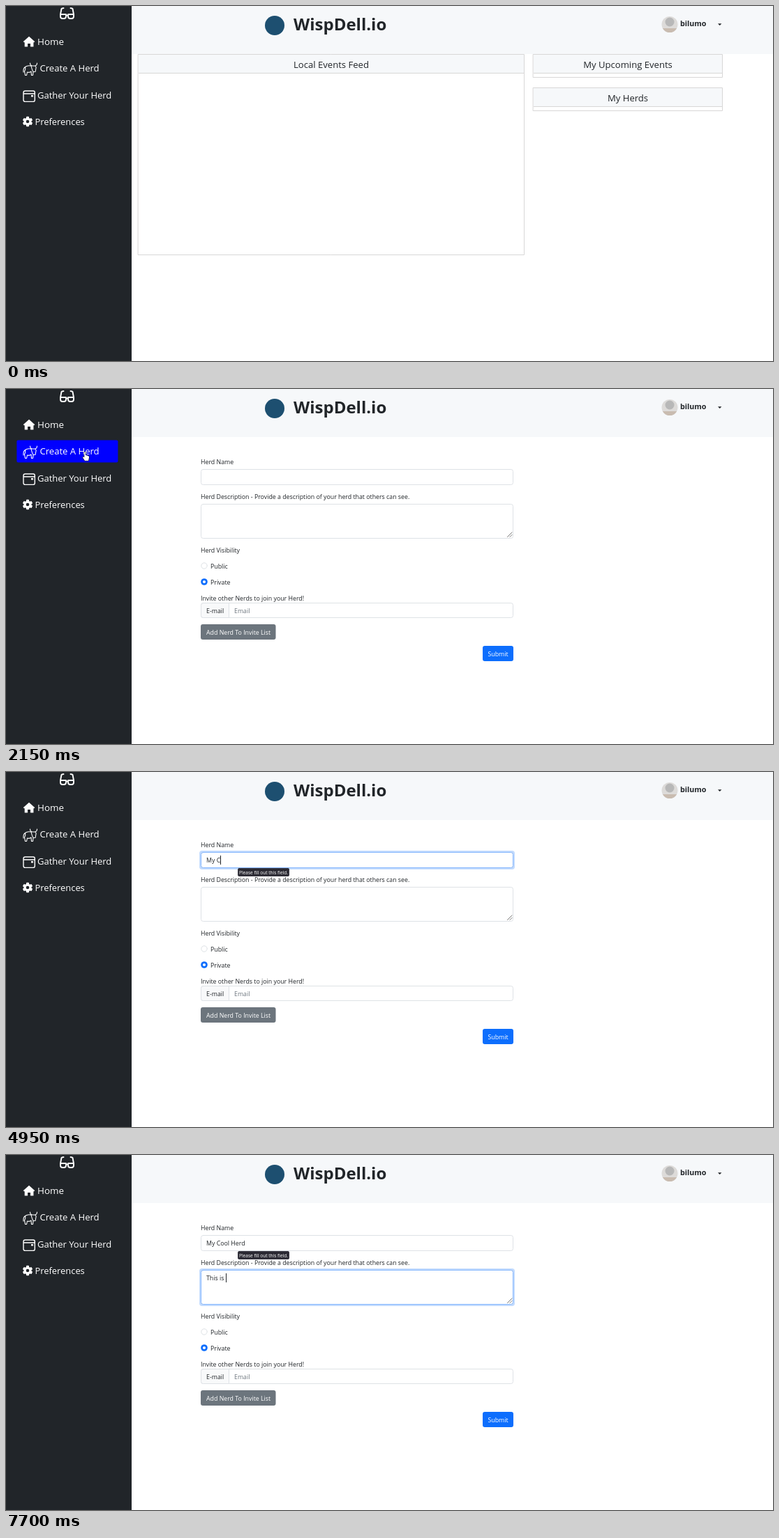
Write an HTML page with a canvas that moves like this. It is 1099 px wide and 510 px high and loops after 8000 ms.

```html
<!DOCTYPE html>
<html lang="en">
<head>
<meta charset="utf-8">
<title>Create a herd</title>
<style>
  html, body { margin: 0; width: 100%; height: 100%; overflow: hidden; background: #fff; }
  canvas { display: block; width: 1099px; height: 510px; }
</style>
</head>
<body>
<canvas id="stage"></canvas>
<script>
const W = 1099, H = 510, LOOP = 8000;
const canvas = document.getElementById('stage');
const c = canvas.getContext('2d');
const dpr = window.devicePixelRatio || 1;
canvas.width = W * dpr;
canvas.height = H * dpr;

const INK = '#212529', BLUE = '#0d6efd', PALE = '#f6f8fa', LINE = '#dee2e6', GRAY = '#6c757d';
const EDGE = '#d8d7d7';
const FONT = '"Open Sans", "Noto Sans", sans-serif';
const NAV = 13.1, SMALL = 8.8;

// Bursts of screen updates: first time, last time, number of steps
const BURSTS = [
  [0, 0, 1], [70, 590, 8], [740, 1440, 10], [1820, 2150, 5], [2460, 3160, 10],
  [3540, 3630, 2], [4100, 4100, 1], [4330, 4470, 3], [4630, 4700, 2], [4870, 5020, 3],
  [5190, 5190, 1], [5340, 5340, 1], [5510, 5510, 1], [5660, 5890, 4], [6060, 6060, 1],
  [6290, 6290, 1], [6440, 6520, 2], [6970, 7700, 9]
];

// Pointer track: time, x, y
const TRACK = [
  [70, 937, 482], [590, 161, 276], [665, 161, 276], [1200, 116, 99], [1280, 115, 91],
  [1800, 115, 91], [1820, 113, 90], [2390, 113, 90], [2930, 333, 126]
];

const NAME = 'My Cool Herd';
const NAME_KEYS = [4330, 4630, 4700, 4870, 5020, 5190, 5340, 5510, 5660, 5736, 5890, 6060];
const DESC = 'This is ';

const HAND = 'M-.7 1Q0-.5 1 1V5L5 6Q6.2 6.5 6 8.5L5 13H0L-3 8.5Q-2.8 6.8-.7 8.2Z';
const ARROW = 'M0 0V10L2.4 8 4 11.5 5.6 10.8 4.2 7.5H7.2Z';
const IBEAM = 'M-2-4.5H2M0-4.5V4.5M-2 4.5H2';

const clamp = v => Math.max(0, Math.min(1, v));
const ramp = (t, a, b) => clamp((t - a) / (b - a));
const easeOut = u => 1 - (1 - u) * (1 - u);
const smooth = u => u * u * (3 - 2 * u);

function snap(t) {
  let last = 0;
  for (const [a, b, n] of BURSTS) {
    if (t < a) break;
    const gap = n > 1 ? (b - a) / (n - 1) : 1;
    last = a + Math.min(n - 1, Math.floor((t - a) / gap + 1e-6)) * gap;
  }
  return last;
}

function pointerAt(t) {
  let i = 0;
  while (i < TRACK.length - 2 && t >= TRACK[i + 1][0]) i++;
  const [t0, x0, y0] = TRACK[i], [t1, x1, y1] = TRACK[i + 1];
  const u = smooth(ramp(t, t0, t1));
  return [Math.round(x0 + (x1 - x0) * u), Math.round(y0 + (y1 - y0) * u)];
}

function text(s, x, y, size = SMALL, color = INK, weight = 400, align = 'left') {
  c.font = `${weight} ${size}px ${FONT}`;
  c.textAlign = align;
  c.fillStyle = color;
  c.fillText(s, x, y);
}

function rect(x, y, w, h, fill) {
  c.fillStyle = fill;
  c.fillRect(x, y, w, h);
}

function box(x, y, w, h, r, fill, stroke) {
  c.beginPath();
  if (stroke) c.roundRect(x + .5, y + .5, w - 1, h - 1, r);
  else c.roundRect(x, y, w, h, r);
  if (fill) { c.fillStyle = fill; c.fill(); }
  if (stroke) { c.strokeStyle = stroke; c.lineWidth = 1; c.stroke(); }
}

function disc(x, y, r, fill, stroke) {
  c.beginPath();
  c.arc(x, y, r, 0, Math.PI * 2);
  if (fill) { c.fillStyle = fill; c.fill(); }
  if (stroke) { c.strokeStyle = stroke; c.lineWidth = 1; c.stroke(); }
}

function line(d, width, color = '#fff') {
  c.lineWidth = width;
  c.strokeStyle = color;
  c.lineCap = c.lineJoin = 'round';
  c.stroke(new Path2D(d));
}

function shape(d, fill) {
  c.fillStyle = fill;
  c.fill(new Path2D(d));
}

function faded(alpha, paint) {
  if (alpha <= 0) return;
  c.globalAlpha = alpha;
  paint();
  c.globalAlpha = 1;
}

function gear(x, y) {
  c.save();
  c.translate(x, y);
  for (let i = 0; i < 6; i++) {
    box(-2, -7.2, 4, 4, 1, '#fff');
    c.rotate(Math.PI / 3);
  }
  c.beginPath();
  c.arc(0, 0, 3.9, 0, Math.PI * 2);
  c.lineWidth = 3.2;
  c.strokeStyle = '#fff';
  c.stroke();
  c.restore();
}

function sidebar(hover) {
  rect(0, 0, 180, H, INK);
  faded(hover, () => box(15.4, 73.4, 145, 32, 2, '#00f'));
  // glasses
  line('M78 12V15Q78 18 81 18H83Q86 18 86 15V12ZM89 12V15Q89 18 92 18H94Q97 18 97 15V12ZM86 13.5H89M78 12L79.5 4Q80 3 82.5 3M97 12L95.5 4Q95 3 92.5 3', 1.9);
  // house
  shape('M33 43.8L41.4 51.3 39.4 52.4V58.4H35V54H31V58.4H26.7V52.4L24.6 51.3Z', '#fff');
  // ox
  line('M27.5 87.5Q24.5 89 25 95M27.5 87.5Q31 85 35.5 86M27.5 87.5Q28.5 91 26.5 94L27.5 99.5H29.5L30.5 95Q34 96 36 94L36.5 99.5H38.5L39 95M34.5 82Q34.5 85.5 37.5 86H41.5Q44.5 85.5 44.5 82M36 86Q37 91 39 94.5H42L43.2 88 41.5 86', 1.1);
  // calendar
  line('M27.5 122H39Q41.3 122 41.3 124.5V135Q41.3 137.4 39 137.4H27.5Q25 137.4 25 135V124.5Q25 122 27.5 122ZM25 126H41', 1.4);
  rect(36, 128, 3, 2.5, '#fff');
  gear(31, 166);

  text('Home', 45, 56, NAV + .3, '#fff');
  text('Create A Herd', 48.5, 94, NAV, '#fff');
  text('Gather Your Herd', 45, 133, NAV - .1, '#fff');
  text('Preferences', 41.5, 171, NAV - .2, '#fff');
}

function header() {
  rect(180, 0, W - 180, 69, PALE);
  disc(385, 28, 14, '#1d4f70');
  text('WispDell.io', 412, 35, 24, INK, 700);
  c.save();
  c.beginPath();
  c.arc(951, 26.5, 11.5, 0, Math.PI * 2);
  c.clip();
  rect(939, 15, 24, 24, '#dddbd9');
  disc(951, 23, 6.5, '#b8b8b8');
  rect(939, 32, 24, 8, '#c9bcb0');
  c.restore();
  text('bilumo', 966, 29, 10.7, INK, 700);
  shape('M1020 25.3H1025.4L1022.7 28Z', INK);
}

function card(x, y, w, h, title) {
  box(x, y, w, h, 0, '#fff', EDGE);
  rect(x + 1, y + 1, w - 2, 27, PALE);
  rect(x + 1, y + 27, w - 2, 1, EDGE);
  text(title, x + w / 2, y + 20, NAV, INK, 400, 'center');
}

function feed() {
  card(189, 69, 554, 289, 'Local Events Feed');
  card(755, 69, 272, 34, 'My Upcoming Events');
  card(755, 117, 272, 34, 'My Herds');
}

function field(y, h, focus) {
  faded(focus, () => box(277, y - 2, 452, h + 4, 4, '#c2dbfe'));
  box(279, y, 448, h, 3, '#fff', LINE);
  faded(focus, () => box(279, y, 448, h, 3, null, '#86b7fe'));
}

function typed(s, y, caret) {
  text(s, 287, y);
  if (caret) rect(Math.round(287 + c.measureText(s).width), y - 10, 1, 13, INK);
}

function form(t) {
  const tab = t < 6440 ? 0 : t < 6515 ? .5 : 1;
  const focus = ramp(t, 2960, 3120) * (1 - tab);
  const nameCaret = (t >= 3000 && t < 3600) || (t >= 4100 && t < 6290);
  const letters = Math.max(0, Math.floor((t - 6970) / 91));
  const descCaret = t >= 6440 && (t < 6970 || letters > 0);

  text('Herd Name', 279, 108);
  field(115, 23, focus);
  typed(NAME.slice(0, NAME_KEYS.filter(k => t >= k - 1).length), 130, nameCaret);

  text('Herd Description - Provide a description of your herd that others can see.', 279, 158);
  field(165, 50, tab);
  line('M718.5 212.5L725 206M722 212.5L725 209.5', 1, '#777');
  typed(DESC.slice(0, letters), 180, descCaret);

  text('Herd Visibility', 279, 235);
  disc(284, 254, 4.2, '#fff', LINE);
  text('Public', 293, 258);
  disc(284, 277, 4.8, BLUE);
  disc(284, 277, 2.1, '#fff');
  text('Private', 293, 281);

  text('Invite other Nerds to join your Herd!', 279, 304);
  box(279, 307, 448, 22, 3, '#fff', LINE);
  box(279, 307, 41, 22, [3, 0, 0, 3], '#f8f9fa', LINE);
  text('E-mail', 287, 322);
  text('Email', 327, 322, SMALL, GRAY);
  box(279, 338, 107.5, 22, 3, GRAY);
  text('Add Nerd To Invite List', 287, 353, SMALL, '#fff');
  box(683, 369, 44, 22, 3, BLUE);
  text('Submit', 690.5, 384, SMALL, '#fff');

  if (t >= 3540) {
    box(332, 138, 74, 12, 1.5, '#2b2a33', '#3d3c46');
    text('Please fill out this field.', 334, 146.6, 6.55, '#fff');
  }
}

function pointer(t) {
  if (t < 70 || t >= 4330) return;
  const [x, y] = pointerAt(t);
  const overNav = x > 15 && x < 160 && y >= 73 && y < 105;
  const overField = t >= 2460 && y >= 115 && x >= 279;
  c.save();
  c.translate(x, y);
  if (overField) {
    line(IBEAM, 1, '#222');
  } else {
    const icon = overNav ? HAND : ARROW;
    line(icon, 1.2, '#111');
    shape(icon, '#fff');
  }
  c.restore();
}

function draw(time) {
  const t = snap(time);
  const hover = easeOut(ramp(t, 1190, 1446)) * (1 - ramp(t, 2500, 2720));
  c.setTransform(dpr, 0, 0, dpr, 0, 0);
  rect(0, 0, W, H, '#fff');
  sidebar(hover);
  header();
  if (t < 1900) feed();
  else form(t);
  pointer(t);
}

const start = performance.now();
function tick() {
  draw((performance.now() - start) % LOOP);
  requestAnimationFrame(tick);
}
tick();
</script>
</body>
</html>
```
